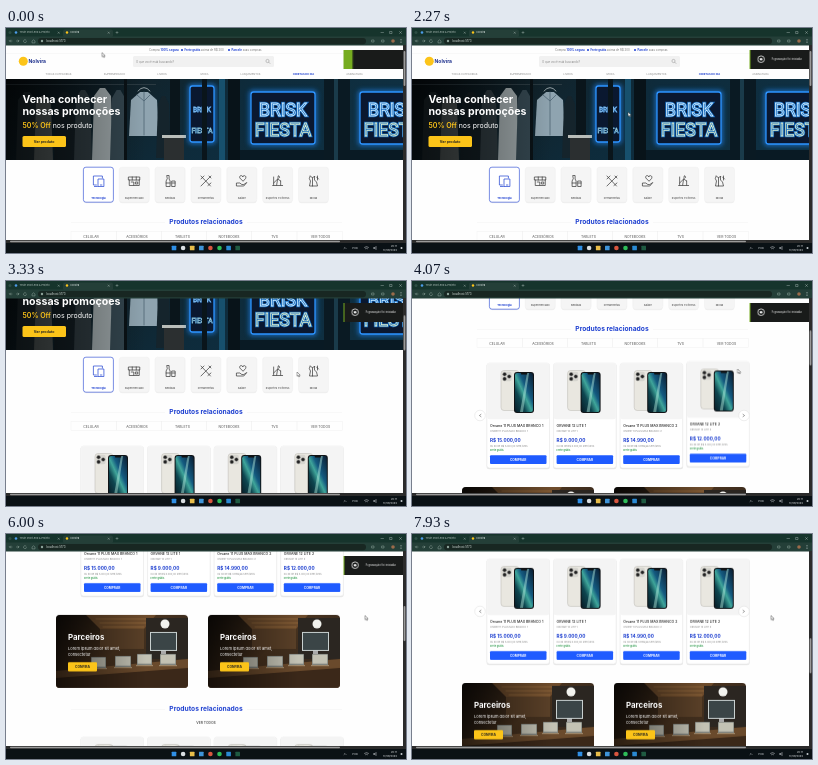
These frames come from a looping animation (400x225 px, 8 s). An HTML page:

```html
<!DOCTYPE html>
<html lang="pt-BR">
<head>
<meta charset="utf-8">
<title>Loja</title>
<style>
html, body { margin: 0; width: 100%; height: 100%; overflow: hidden; background: #fff; }
svg { display: block; width: 100vw; height: 100vh; font-family: Inter, "Open Sans", sans-serif; }
</style>
</head>
<body>
<svg id="stage" viewBox="0 0 400 225" preserveAspectRatio="none" xmlns="http://www.w3.org/2000/svg">
  <defs>
    <clipPath id="view"><rect y="17" width="397" height="195"/></clipPath>
    <clipPath id="hero"><rect y="51" width="397" height="81"/></clipPath>
    <clipPath id="round"><rect width="132" height="73" rx="4"/></clipPath>
    <clipPath id="toast"><rect x="337" y="21.500" width="60" height="20"/></clipPath>
    <filter id="soft" x="-30%" y="-30%" width="160%" height="160%"><feGaussianBlur stdDeviation="2.500"/></filter>
    <linearGradient id="wall" x2="1" y2=".2">
      <stop offset="0" stop-color="#070e12"/><stop offset=".35" stop-color="#11242d"/>
      <stop offset=".6" stop-color="#0e2b3b"/><stop offset="1" stop-color="#0f3042"/>
    </linearGradient>
    <linearGradient id="shade"><stop offset="0" stop-opacity=".6"/><stop offset="1" stop-opacity="0"/></linearGradient>
    <linearGradient id="shop" x2="1" y2=".6">
      <stop offset="0" stop-color="#17110c"/><stop offset=".55" stop-color="#49331f"/><stop offset="1" stop-color="#30251c"/>
    </linearGradient>
    <linearGradient id="screen" x1="0" y1="1" x2="1" y2="0">
      <stop offset="0" stop-color="#081c26"/><stop offset=".3" stop-color="#0e4650"/>
      <stop offset=".48" stop-color="#3fa59a"/><stop offset=".62" stop-color="#145a80"/><stop offset="1" stop-color="#0a1c30"/>
    </linearGradient>
  </defs>
  <g clip-path="url(#view)">
    <rect width="400" height="225" fill="#fefefe"/>
    <g id="page"></g>
  </g>
  <g id="chrome"></g>
  <g id="toastBox" clip-path="url(#toast)"></g>
  <path id="cursor" d="M0 0V4.300L1.100 3.400 1.900 5 2.500 4.700 1.800 3.200H3.200Z" fill="#fff" stroke="#222" stroke-width=".4"/>
</svg>
<script>
const LOOP = 8000;
const $ = id => document.getElementById(id);
const BLUE = '#1d3fd0', YELLOW = '#fcc419';

const rect = (x, y, w, h, fill, more = '') =>
  `<rect x="${x}" y="${y}" width="${w}" height="${h}" fill="${fill}" ${more}/>`;
const circle = (x, y, r, fill, more = '') =>
  `<circle cx="${x}" cy="${y}" r="${r}" fill="${fill}" ${more}/>`;
// y is the visual middle of the line
const text = (x, y, size, fill, str, { w = 400, a = 'start' } = {}) =>
  `<text x="${x}" y="${y + size * .36}" font-size="${size}" fill="${fill}" font-weight="${w}" text-anchor="${a}">${str}</text>`;
const line = (d, color = '#222', w = .7) =>
  `<path d="${d}" fill="none" stroke="${color}" stroke-width="${w}" stroke-linecap="round" stroke-linejoin="round"/>`;
const at = (x, y, body, more = '') => `<g transform="translate(${x} ${y})" ${more}>${body}</g>`;
const mid = w => ({ w, a: 'middle' });

function header() {
  const bold = s => `<tspan font-weight="700" fill="${BLUE}">${s}</tspan>`;
  let s = text(143, 22, 2.850, '#777', `Compra ${bold('100% segura')}`)
    + text(178.500, 22, 2.850, '#777', `${bold('Frete grátis')} acima de R$ 200`)
    + text(225.500, 22, 2.850, '#777', `${bold('Parcele')} suas compras`)
    + circle(176, 22, 1, BLUE) + circle(223, 22, 1, BLUE)
    + rect(0, 25.500, 397, .3, '#ececec')
    + circle(17.300, 33.300, 4.500, YELLOW)
    + text(22.500, 33.300, 5, '#1c2f8c', 'Nolvira', { w: 700 })
    + rect(127, 28, 141, 11, '#f1f1f1', 'rx="1.500"')
    + text(130, 33.500, 2.900, '#888', 'O que você está buscando?')
    + circle(261.500, 33, 1.600, 'none', 'stroke="#777" stroke-width=".4"') + line('M262.700 34.200l1.300 1.300', '#777', .4);
  const nav = [[52.500, 'TODAS CATEGORIAS'], [108.500, 'SUPERMERCADO'], [156, 'LIVROS'], [198.500, 'MODA'],
    [244.500, 'LANÇAMENTOS'], [297.500, 'OFERTAS DO DIA'], [348.500, 'ASSINATURA']];
  nav.forEach(([x, label], i) => {
    s += text(x, 46, 2.600, i == 5 ? BLUE : '#8a8a8a', label, mid(i == 5 ? 700 : 400));
  });
  return s;
}

function neon(x, y, w, h) {
  const tubes = (cy, str, color) => [['#1483f0', 2.400, .75], [color, .8, 1]].map(([c, sw, o]) =>
    `<text x="${x + w / 2}" y="${cy}" font-family="Roboto, sans-serif" font-size="${w * .275}" text-anchor="middle"
      fill="none" stroke="${c}" stroke-width="${sw * w / 64}" opacity="${o}">${str}</text>`).join('');
  return rect(x - 2, y - 2, w + 4, h + 4, '#1a7be0', 'opacity=".75" rx="4" filter="url(#soft)"')
    + rect(x, y, w, h, '#0a1830', 'rx="2.500" stroke="#2d94ff" stroke-width="1.300"')
    + tubes(y + h * .46, 'BRISK', '#d5f1ff') + tubes(y + h * .84, 'FIESTA', '#e6f2c8');
}

function hero() {
  // a hanging garment: collar at the top, hem at y + h
  const cloth = (x, y, w, h, fill) => `<path d="M${x + w * .35} ${y}L${x} ${y + 8}L${x - 2} ${y + h}H${x + w + 2}L${x + w} ${y + 8}L${x + w * .65} ${y}Z" fill="${fill}"/>`;
  const photo = rect(0, 51, 397, 81, 'url(#wall)')
    + rect(0, 56, 150, .6, '#3d4a50')
    + cloth(12, 64, 18, 68, '#1c272c') + cloth(30, 68, 15, 64, '#4b5252') + cloth(50, 64, 18, 68, '#121c21')
    + cloth(70, 62, 14, 70, '#2d383d') + cloth(88, 60, 17, 72, '#98a1a3') + cloth(106, 62, 13, 70, '#33454e')
    + rect(118, 51, 3, 81, '#0a1216')
    + cloth(125, 64, 26, 44, '#8fa4b0') + line('M138 64V107M131 67l7 6 6-6', '#4e6675', .8)
    + line('M132 63q6-7 12 0', '#c9d3d6', .7)
    + cloth(152, 68, 11, 62, '#15242c')
    + rect(164, 51, 10, 81, '#0a151b') + rect(156, 107, 24, 3, '#b9bdb9') + rect(158, 110, 20, 22, '#2b2f30')
    + neon(184, 58, 24, 56) + rect(196, 51, 5, 81, '#0a151b')
    + rect(213, 51, 6, 81, '#17506d') + rect(222, 51, 12, 81, '#081319')
    + neon(245, 64, 64, 52)
    + rect(318, 51, 26, 81, '#0a1a23') + rect(328, 51, 4, 81, '#1a3b4a')
    + neon(354, 64, 64, 52)
    + rect(234, 122, 84, 10, '#091a24') + rect(344, 122, 53, 10, '#091a24')
    + rect(0, 51, 140, 81, 'url(#shade)');
  return `<g clip-path="url(#hero)">${photo}</g>`
    + text(16.500, 71, 10.600, '#fff', 'Venha conhecer', { w: 700 })
    + text(16.500, 83, 10.600, '#fff', 'nossas promoções', { w: 700 })
    + text(16.500, 97, 7, '#fff', `<tspan fill="${YELLOW}" font-weight="600">50% Off</tspan> nos produto`)
    + rect(16.500, 108, 43.500, 11, YELLOW, 'rx="1.500"')
    + text(38.200, 113.500, 3.600, '#222', 'Ver produto', mid(700));
}

// icon strokes are centred on 0,0
const cats = [
  ['Tecnologia', 'M-2 4H-5V-5H4V-3M-4 5.500H-1M0-2H5.500V5.500H0ZM2 4H3.500'],
  ['Supermercado', 'M-5.500-4H5.500V-1H-5.500ZM-5-1V4.500H5V-1M-3 1H-.500V4M1.500 1H3.500V3H1.500ZM-2-4V-1M2-4V-1'],
  ['Bebidas', 'M-3-5.500H-1V-2L0 0V5.500H-4V0L-3-2ZM-4 2H0M2 0H5V5.500H2ZM2 2H5'],
  ['Ferramentas', 'M-5-5L4.500 5M5-5L-5 5M-5-2L-2-5M2 4.500L5 2M3-5L5-3'],
  ['Saúde', 'M1 0L-2-3C-3-6 1-6 1-4C1-6 5-6 4-3ZM-5 2H-2L0 3.500H2L5 1.500L2 5H-5Z'],
  ['Esportes e Fitness', 'M-5 4.500H5M-4 2L0-2L3 0M-4-4V4M0-2L-1 4M3 0V4M1-5a1 1 0 1 0 .1 0'],
  ['Moda', 'M-3-5L-1-3L1-5V-1L3 1L4 5H-4L-3 0L-4-2ZM-1-3V5M3-4L5-2M4-5V-1']
];

function categories() {
  return cats.map(([name, icon], i) => {
    const x = 92.400 + i * 35.850, on = !i, c = on ? BLUE : '#333';
    return rect(x - 14.500, 140.200, 29, 35, '#000', 'opacity=".06" rx="2.500"')
      + rect(x - 15, 139.200, 30, 35, on ? '#fff' : '#f5f5f5', `rx="2.500" stroke="${on ? BLUE : '#ebebeb'}" stroke-width="${on ? .6 : .4}"`)
      + at(x, 153, line(icon, c, .7))
      + text(x, 170, 2.700, on ? BLUE : '#555', name, mid(on ? 700 : 500));
  }).join('');
}

function phone() {
  return rect(14, 7.500, 18, 40, '#e9e7e0', 'rx="3" stroke="#b9b7b0" stroke-width=".5"')
    + rect(15.200, 8.800, 9.500, 9.500, '#d6d5cf', 'rx="2.200"')
    + [[17.600, 11.200], [17.600, 15.900], [22.200, 13.500]].map(([x, y]) => circle(x, y, 1.800, '#222', 'stroke="#8b8b88" stroke-width=".5"')).join('')
    + rect(27, 9, 20, 41, '#101417', 'rx="3"')
    + rect(28, 10, 18, 39, 'url(#screen)', 'rx="2.200"')
    + `<path d="M33 49L40 10H42L36 49Z" fill="#b9efe0" opacity=".45"/>`
    + rect(33.800, 10, 6.500, 1.600, '#111', 'rx=".8"');
}

const items = [
  ['Orvane 11 PLUS MAX BRANCO 1', '15.000,00', '5.000,00'],
  ['ORVANE 12 LITE 1', '9.000,00', '3.000,00'],
  ['Orvane 11 PLUS MAX BRANCO 2', '14.990,00', '4.996,66'],
  ['ORVANE 12 LITE 2', '12.000,00', '4.000,00']
];

function products(y, id) {
  const cards = items.map(([name, price, part], i) => at(75 + i * 66.600, y, `<g id="${id}${i}">`
    + rect(-.4, .4, 63.300, 105.800, '#000', 'opacity=".09" rx="2.500"')
    + rect(0, 0, 62.500, 105, '#fff', 'rx="2.500" stroke="#e6e6e6" stroke-width=".4"')
    + rect(.2, .2, 62.100, 56, '#f4f4f4', 'rx="2.500"') + phone()
    + text(3, 62.300, 3.500, '#222', name, { w: 500 })
    + text(3, 68.300, 2.500, '#888', name)
    + text(3, 77, 4.700, BLUE, 'R$ ' + price, { w: 700 })
    + text(3, 82.700, 2.500, '#888', `ou 3x de R$ ${part} sem juros`)
    + text(3, 87, 2.500, '#2c9a4b', 'Frete grátis', { w: 600 })
    + rect(3, 92.300, 56.500, 8.700, '#1f5bff', 'rx="1"')
    + text(31.200, 96.600, 3.200, '#fff', 'COMPRAR', mid(700)) + '</g>')).join('');
  const arrow = (x, d) => circle(x, y + 52.500, 5.300, '#fff', 'stroke="#dcdcdc" stroke-width=".5"')
    + line(`M${x - d} ${y + 51.300}l${d * 1.600} 1.200l${-d * 1.600} 1.200`, '#444', .5);
  return cards + arrow(68, -1) + arrow(332, 1);
}

function partner(x, y) {
  const laptop = (px, py, w, h) => rect(px, py, w, h, '#7f8480', 'rx=".6"') + rect(px + .7, py + .7, w - 1.400, h - 2, '#c3c2b4')
    + rect(px - 1, py + h, w + 2, 1.200, '#a08a6d');
  const photo = rect(0, 0, 132, 73, 'url(#shop)')
    + `<path d="M30 0H100L88 14H44Z" fill="#6e4c2c"/><path d="M44 14H88V34H44Z" fill="#5a4028"/>`
    + line('M40 4H94M44 8H91M47 12H88', '#966b3d', .7)
    + rect(90, 3, 42, 41, '#2b2621') + circle(109, 9, 4.500, '#f2f2ee')
    + rect(94, 17, 27, 19, '#c8d0cf') + rect(95, 18, 25, 17, '#3b4547') + rect(105, 36, 5, 5, '#aaa')
    + `<path d="M0 56L132 44V73H0Z" fill="#6a4a2c"/><path d="M0 63L132 53V73H0Z" fill="#3b2819"/>`
    + laptop(35, 42, 15, 11) + laptop(59, 41, 16, 11) + laptop(81, 39, 15, 11) + laptop(104, 39, 16, 11)
    + rect(0, 0, 90, 73, 'url(#shade)');
  return at(x, y, `<g clip-path="url(#round)">${photo}</g>`
    + text(12, 22.500, 7.900, '#fff', 'Parceiros', { w: 700 })
    + text(12, 34, 4, '#fff', 'Lorem ipsum dolor sit amet,')
    + text(12, 40, 4, '#fff', 'consectetur')
    + rect(12, 47.300, 29, 9.200, YELLOW, 'rx="1"')
    + text(26.500, 52, 3.300, '#222', 'CONFIRA', mid(700)));
}

function section(titleY, tabsY, cardY, tabs, id) {
  const cells = tabs.length > 1 ? tabs.map((_, i) =>
    rect(65 + i * 45.200, tabsY - 5, 45.200, 9, 'none', 'stroke="#ededed" stroke-width=".4"')).join('') : '';
  return rect(65, titleY, 94, .3, '#ebebeb') + rect(241, titleY, 95, .3, '#ebebeb')
    + text(200, titleY, 6.700, BLUE, 'Produtos relacionados', mid(700)) + cells
    + tabs.map(([x, s]) => text(x, tabsY, 3.400, '#555', s, mid(cells ? 400 : 600))).join('')
    + products(cardY, id) + partner(50, cardY + 124) + partner(202, cardY + 124);
}

const tabs = [[85, 'CELULAR'], [131, 'ACESSÓRIOS'], [176.500, 'TABLETS'], [223, 'NOTEBOOKS'], [268.500, 'TVS'], [314.500, 'VER TODOS']];
$('page').innerHTML = header() + hero() + categories()
  + section(194, 208.500, 228, tabs, 'a') + section(446, 460, 474, [[200, 'VER TODOS']], 'b');

function browser() {
  const dots = [['#2f8fe6', 1], ['#d9dee2', 0], ['#e8bd4a', 1], ['#3f94d8', 1], ['#d8563f', 0], ['#2ebd59', 0], ['#2a8ad4', 1], ['#1f5a42', 1]];
  let s = rect(0, 0, 400, 9, '#16342c') + rect(0, 8.500, 400, 9, '#243f38')
    + rect(57, 1.500, 50, 8, '#243f38', 'rx="2"')
    + circle(4, 4.500, 1.500, '#2d4d44') + circle(10, 4.500, 1.300, '#4c9be8')
    + text(13.500, 4.500, 2.500, '#bccac5', 'Teste Front-End & Projeto')
    + circle(61, 4.500, 1.200, YELLOW) + text(64.500, 4.500, 2.600, '#dfe8e4', 'Nolvira')
    + line('M52 4l1.400 1.400M53.400 4l-1.400 1.400M102 4l1.400 1.400M103.400 4l-1.400 1.400M110 4.500h2M111 3.500v2', '#bccac5', .35)
    + line('M375 4.500h2.500M384 3.500h2v2h-2zM393.500 3.500l2 2M395.500 3.500l-2 2', '#cfd9d5', .35)
    + line('M6 13h-2.500l1-1M3.500 13l1 1M10.500 13h2.500l-1-1M13 13l-1 1M20 12a1.500 1.500 0 1 0 .5 1.500M26 14.500v-1.500l1.500-1.200 1.500 1.200v1.500z', '#a9bab3', .4)
    + rect(32, 10, 328, 6.200, '#182722', 'rx="3"') + circle(36, 13, 1.200, '#8ea39b')
    + text(40, 13, 2.900, '#d5dfdb', 'localhost:5173')
    + line('M366 12h2v2h-2zM376 12h2v2h-2z', '#a9bab3', .4) + circle(387, 13, 1.800, '#9b6b4a')
    + line('M395 11.500v.1M395 13v.1M395 14.500v.1', '#dfe8e4', .6)
    + rect(397, 17, 3, 195, '#2b2b2b') + rect(397.600, 23, 1.800, 35, '#9a9a9a', 'rx=".9" id="thumb"')
    + rect(0, 212, 400, 3, '#2b2b2b') + rect(4, 212.700, 330, 1.500, '#9a9a9a', 'rx=".7"')
    + rect(0, 215, 400, 10, '#0a1115');
  dots.forEach(([c, square], i) => {
    const x = 168 + i * 9.100;
    s += square ? rect(x - 2.300, 217.700, 4.600, 4.600, c, 'rx=".5"') : circle(x, 220, 2.300, c);
  });
  return s + line('M338 220.500l1-1 1 1M358.500 219.300q2-1.500 4 0M359.500 220.600q1-.8 2 0M368 219.500h1l1-1v3l-1-1h-1z', '#d8dde0', .5)
    + text(349, 220, 2.700, '#d8dde0', 'POR', mid(400))
    + text(391, 218.300, 2.600, '#e3e6e8', '20:11', { a: 'end' })
    + text(391, 222, 2.600, '#e3e6e8', '17/09/2024', { a: 'end' })
    + circle(395.500, 220, 1, '#c7cdd1');
}
$('chrome').innerHTML = browser();

$('toastBox').innerHTML = rect(337.500, 22, 58, 19, '#76ac20', 'id="green"')
  + `<g id="panel">${rect(338.500, 22, 58.500, 19, '#191b1a')}<g id="label">`
  + circle(349, 31.200, 3.300, 'none', 'stroke="#f2f2f2" stroke-width=".8"') + circle(349, 31.200, 1.300, '#f2f2f2')
  + text(359.500, 31.200, 2.800, '#f2f2f2', 'A gravação foi iniciada') + '</g></g>';

// rows: [time, value...]
function play(el, rows, frame) {
  const last = rows[rows.length - 1];
  if (last[0] < LOOP) rows = [...rows, [LOOP, ...last.slice(1)]];
  el.animate(rows.map(([t, ...v]) => ({ offset: t / LOOP, ...frame(...v) })), { duration: LOOP, iterations: Infinity });
}
const move = (x, y = 0) => ({ transform: `translate(${x}px, ${y}px)` });
const fade = o => ({ opacity: o });

const scroll = [[0, 0], [2670, 0], [2870, 21], [3080, 42], [3300, 63], [3580, 63], [3760, 104], [4000, 146],
  [4480, 146], [4650, 167], [4850, 188], [5080, 208], [5470, 208], [5700, 250], [6000, 271], [6270, 292],
  [6790, 292], [6870, 301], [6980, 312], [7130, 333], [7270, 354], [7640, 354], [7760, 390], [7930, 449], [8000, 458]];
play($('page'), scroll, y => move(0, -y));
play($('thumb'), scroll, y => move(0, y * .181));

play($('cursor'), [[0, 96, 24.500], [500, 110, 38], [1200, 160, 66], [2270, 216, 84], [2900, 280, 91], [3330, 291, 91], [3600, 302, 90],
  [4000, 325.500, 88], [4400, 326, 88], [5100, 350.500, 79.500], [5470, 350.500, 79.500], [6000, 359, 81.500]], move);
play($('a3'), [[0, 0], [3830, 0], [3980, -1.500], [4450, -1.500], [4600, 0]], y => move(0, y));

play($('panel'), [[0, 8.300], [130, 0], [6600, 0], [6800, 60]], x => move(x));
play($('label'), [[0, 0], [130, 0], [330, 1], [6470, 1], [6600, 0]], fade);
play($('green'), [[0, 0], [6930, 0], [7120, 62]], x => move(x));
</script>
</body>
</html>
```
